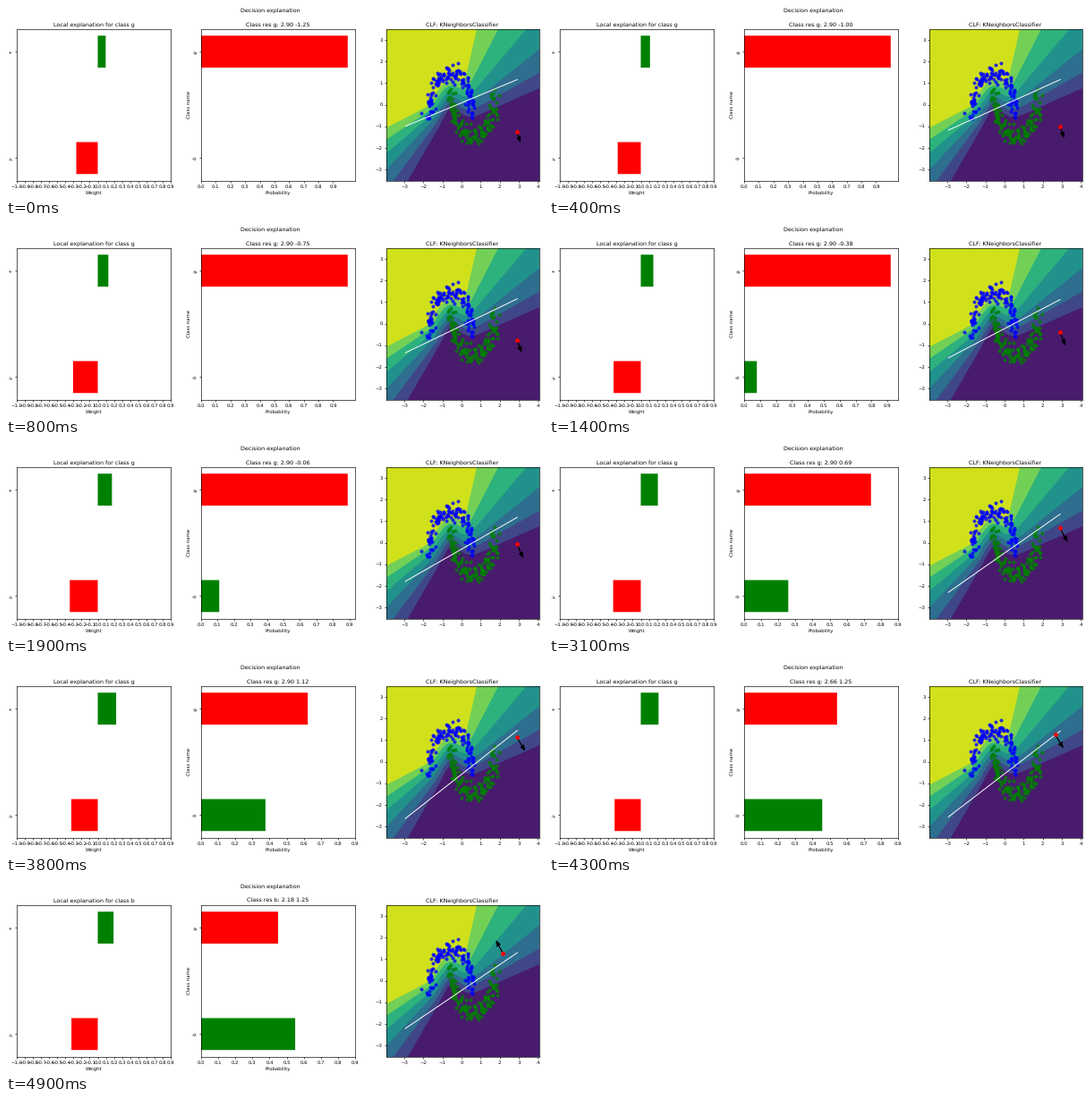
These frames come from a looping animation (600x214 px, 5 s). A matplotlib script:

```python
import matplotlib.pyplot as plt
import numpy as np
from matplotlib.animation import FuncAnimation

W, H, DPI = 600, 214, 100
FRAMES, INTERVAL = 50, 100
S = 0.383  # scale of the default point sizes
TOP, BOTTOM = 25.5, 196.0

plt.rcParams.update({
    "font.family": "DejaVu Sans",
    "text.hinting": "none",
    "font.size": 10 * S,
    "axes.titlesize": 12 * S,
    "axes.titlepad": 6 * S,
    "axes.labelpad": 4 * S,
    "axes.linewidth": 1.2 * S,
})
for axis in ("xtick", "ytick"):
    plt.rcParams.update({f"{axis}.major.width": 1.2 * S,
                         f"{axis}.major.size": 3.5 * S,
                         f"{axis}.major.pad": 3.5 * S})

fig = plt.figure(figsize=(W / DPI, H / DPI), dpi=DPI, facecolor="white")


def add_panel(left, right):
    return fig.add_axes([left / W, 1 - BOTTOM / H, (right - left) / W, (BOTTOM - TOP) / H])


def add_bars(ax, colors, labels):
    bars = ax.barh([0, 1], [0, 0], height=0.3, color=colors, linewidth=0, snap=False)
    ax.set_ylim(-0.215, 1.215)
    ax.set_yticks([0, 1], labels, rotation=60)
    return bars


def smooth(points, rounds=2):
    """Corner cutting that keeps both ends."""
    for _ in range(rounds):
        a, b = points[:-1], points[1:]
        cut = np.stack([0.75 * a + 0.25 * b, 0.25 * a + 0.75 * b], axis=1)
        points = np.vstack([points[:1], cut.reshape(-1, 2), points[-1:]])
    return points


def lerp(a, b, t):
    return a + (b - a) * t


def ray(start, degrees, length=220):
    a = np.radians(degrees)
    return start + length * np.array([np.cos(a), -np.sin(a)])


fig.text(295 / W, 1 - 5.5 / H, "Decision explanation", ha="center", va="center",
         fontsize=12 * S)

weight_ax = add_panel(12, 184)
prob_ax = add_panel(218, 390)
map_ax = add_panel(424.5, 595.5)

weight_bars = add_bars(weight_ax, ["red", "green"], ["y", "x"])
weight_ax.set_xticks(np.round(np.arange(-1, 1, 0.1), 1))
weight_ax.set_xlim(-1, 0.9)
weight_ax.set_xlabel("Weight")

prob_bars = add_bars(prob_ax, ["green", "red"], ["b", "g"])
prob_ax.set_xticks(np.round(np.arange(0, 1, 0.1), 1))
prob_ax.set_xlabel("Probability")
prob_ax.set_ylabel("Class name")
prob_ax.yaxis.set_label_coords(-0.064, 0.5)

# The bands blend from the lowest to the highest boundary (stage pixels),
# with straight rays fanning out on both sides.
LOWEST = np.array([(484, 135), (494, 116), (500, 112), (507, 120), (519, 126), (540, 117)])
HIGHEST = np.array([(470, 113), (482, 95), (492, 83), (503, 83), (510, 87), (514, 78)])
BANDS = 7


def boundary(t):
    core = lerp(LOWEST, HIGHEST, t)
    left = ray(core[0], lerp(240, 207.5, t))
    right = ray(core[-1], lerp(24, 77, t**1.4))
    return np.vstack([left, smooth(core), right])


band_colors = plt.cm.viridis((np.arange(BANDS) + 0.5) / BANDS)
map_ax.set_facecolor(band_colors[0])
for t, color in zip(np.linspace(0, 1, BANDS - 1), band_colors[1:]):
    outline = np.vstack([(0, 500), boundary(t), (900, -300), (0, -300)])
    map_ax.fill((outline[:, 0] - 509) / 21.3, (110.5 - outline[:, 1]) / 24.1,
                color=color, linewidth=0, zorder=1)

# Two noisy interleaved half moons, standardised
rng = np.random.default_rng(7)
COUNT = 130
angle = np.linspace(0, np.pi, COUNT)
upper = np.column_stack([np.cos(angle), np.sin(angle)])
lower = np.array([1, 0.5]) - upper
points = np.vstack([upper, lower]) + rng.normal(0, 0.115, (2 * COUNT, 2))
points = (points - points.mean(axis=0)) / points.std(axis=0)
for color, group in zip(("blue", "green"), np.split(points, 2)):
    map_ax.scatter(*group.T, s=36 * S**2, color=color, alpha=0.75,
                   linewidth=1.5 * S, zorder=2)

LINE_X = np.array([-2.95, 2.92])
(border,) = map_ax.plot(LINE_X, [0, 0], color="white", linewidth=1.8 * S, zorder=3)
arrow = map_ax.arrow(0, 0, 0.1, 0.1, head_width=0.2, head_length=0.25,
                     length_includes_head=True, color="black",
                     linewidth=1.4 * S, zorder=4)
(probe,) = map_ax.plot([0], [0], "o", color="red", markersize=9 * S,
                       markeredgewidth=0, zorder=5)
map_ax.set_xticks(range(-3, 5))
map_ax.set_yticks(range(-3, 4))
map_ax.set_xlim(-3.97, 4.06)
map_ax.set_ylim(-3.55, 3.53)
map_ax.set_title("CLF: KNeighborsClassifier")

CLIMB = 40  # frames spent moving up before turning left


def between_keys(i, *values):
    return np.interp(i, [0, 14, 24, CLIMB, FRAMES - 1], values)


def update(i):
    x = 2.9 - 0.08 * max(i - CLIMB, 0)
    y = -1.25 + 0.0625 * min(i, CLIMB)
    wx = between_keys(i, 0.098, 0.155, 0.195, 0.232, 0.195)
    wy = between_keys(i, -0.265, -0.335, -0.355, -0.322, -0.325)
    middle = between_keys(i, 0.085, -0.23, -0.375, -0.62, -0.455)
    p = min(1, between_keys(i, 1.144, 0.92, 0.86, 0.59, 0.45))
    label, sign = ("g", 1) if p >= 0.5 else ("b", -1)

    for bar, width in zip(weight_bars, (wy, wx)):
        bar.set_width(width)
    for bar, width in zip(prob_bars, (1 - p, p)):
        bar.set_width(width)
    prob_ax.set_xlim(0, max(0.9, 1.05 * p))

    weight_ax.set_title(f"Local explanation for class {label}")
    prob_ax.set_title(f"Class res {label}: {x:.2f} {y:.2f}")

    # The local border is perpendicular to the weight vector.
    border.set_ydata(middle - wx / wy * LINE_X)
    reach = 1.85 * sign
    arrow.set_data(x=x, y=y, dx=reach * wx, dy=reach * wy)
    probe.set_data([x], [y])
    return []


anim = FuncAnimation(fig, update, frames=FRAMES, interval=INTERVAL,
                     init_func=lambda: update(0), repeat=True, repeat_delay=0)
plt.show()
```
